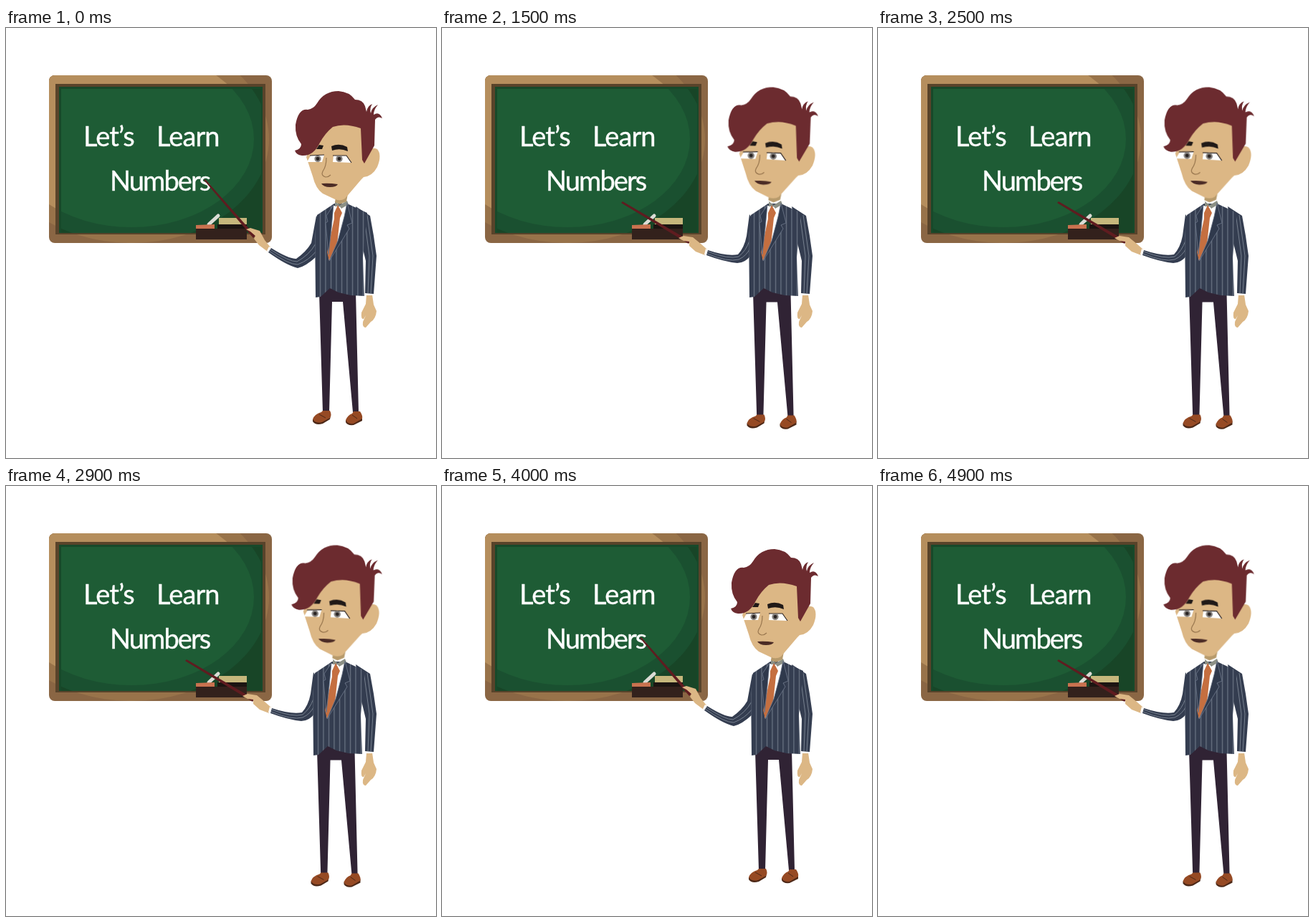
Animation of 600 by 600 pixels, one loop 5 s. Source, as an HTML page:

```html
<!DOCTYPE html>
<html lang="en">
<head>
<meta charset="utf-8">
<title>Let's Learn Numbers</title>
<style>
  html, body { margin: 0; width: 100%; height: 100%; overflow: hidden; background: #fff; }
  svg { display: block; width: 100vw; height: 100vh; }
  .words { font: 38px Lato, "Open Sans", sans-serif; letter-spacing: -.9px; fill: #fff; stroke: #fff; stroke-width: .4; }
  .tight { letter-spacing: -1.9px; }
  .skin { fill: #dcb785; }
  .suit { fill: #343d50; }
  .hair { fill: #6c2b2f; }
  .pin { fill: none; stroke: #77818f; stroke-width: 1; }
  .stick { fill: #5f1c20; }
  .up { animation: up 1s step-end infinite; }
  .down { animation: down 1s step-end infinite; }
  @keyframes up { 0% { opacity: 1; } 50%, 100% { opacity: 0; } }
  @keyframes down { 0% { opacity: 0; } 50%, 100% { opacity: 1; } }
</style>
</head>
<body>
<svg viewBox="0 0 600 600" role="img" aria-label="Teacher pointing at a chalkboard">
  <defs>
    <clipPath id="frame"><rect x="60" y="66" width="311" height="234" rx="8"/></clipPath>
    <pattern id="pins" x="435" width="7.5" height="20" patternUnits="userSpaceOnUse">
      <rect width="7.5" height="20" fill="#343d50"/>
      <rect x="3" width="1" height="20" fill="#77818f"/>
    </pattern>

    <g id="head">
      <path fill="#b79a6b" d="M460 236L478 226L475 242L466 246L459 243Z"/>
      <path class="skin" d="M497 178Q508 164 518 169Q525 177 518 194Q511 207 499 208L496 211L473 238Q467 242 459 239L442 231Q432 224 428 207L419 180L428 160L450 134H497Z"/>
      <path class="hair" d="M403 171Q412 169 412 162Q403 151 404 135Q408 112 421 114Q429 113 434 105Q444 88 464 88Q479 89 487 100Q498 100 501 109L503 117Q504 109 511 106Q507 112 509 119Q510 111 519 107Q513 114 513 121Q521 116 525 126Q519 122 515 128L514 164L500 189L497 184L495 140Q473 132 456 138Q445 147 438 160Q429 179 413 178Q405 177 403 171Z"/>
      <path fill="#201917" d="M437 163L443 164L441 169L433 169ZM454 165Q465 160 476 166L477 172Q466 167 455 171Z"/>
      <path fill="#fff" d="M425 178L444 177L441 187L420 187ZM457 178H475L482 188L456 187Z"/>
      <path fill="none" stroke="#2b211e" stroke-width="1.1" d="M424 178L444 177M456 178H475L482 188"/>
      <g fill="#85817e"><circle cx="435" cy="182.5" r="4.6"/><circle cx="465" cy="182.5" r="4.6"/></g>
      <g fill="#282322"><circle cx="435" cy="182.5" r="2.4"/><circle cx="465" cy="182.5" r="2.4"/></g>
      <path fill="none" stroke="#99774f" stroke-width="1.2" d="M447 181Q447 193 442 200Q439 206 446 208Q450 208 453 205"/>
      <path fill="#4b2b25" d="M440 217Q451 216 463 218Q461 222 452 222Q443 222 440 217Z"/>
    </g>

    <g id="torso">
      <path fill="url(#pins)" d="M458 245L434 261L431 290L432 376L439 375L452 363L464 369L481 373L500 374L498 320L504 258L476 245Z"/>
      <path fill="#fff" d="M457 248L466 249L475 246L474 264L463 297L450 324L453 280Z"/>
      <path fill="#8c9085" d="M459 242L466 247L476 241L478 246L468 252L465 248L459 249Z"/>
      <path fill="#c56f40" d="M463 247L469 258L466 265L462 302L451 325L448 313L458 266L458 258Z"/>
      <path fill="#2f394c" stroke="#717b8f" stroke-width=".8" d="M457 247L447 262L449 270L446 272L450 316L454 280ZM476 244L483 272L476 275L479 280L451 325L463 297L472 263Z"/>
    </g>

    <g id="farArm">
      <path class="skin" d="M503 372H511L513 386L517 395Q516 406 509 410L502 418Q497 418 498 410L502 401L499 406Q495 407 496 397L502 385Z"/>
      <path fill="#fff" d="M501 370H513L512 373H501Z"/>
      <path class="suit" d="M488 249L508 262L513 290L517 318L513 371L501 370L502 325L496 300Z"/>
      <path class="pin" d="M499 258L507 318L505 370M504 261L512 318L509 370"/>
    </g>

    <path id="legs" fill="#302334" d="M437 370L442 536H451L455 382H470L484 536H492L488 368L452 360Z"/>

    <g id="shoes">
      <path fill="#4c2817" d="M428 546L441 548L453 541L452 546L442 552Q432 555 428 549ZM474 547L486 549L497 543V548L485 554Q476 555 474 550Z"/>
      <path fill="#964a24" d="M428 546Q430 539 440 536L442 534H452Q455 540 452 544L441 550Q432 552 428 546ZM474 547Q477 540 483 538L485 535H494Q498 541 497 545L485 552Q476 553 474 547Z"/>
      <path fill="none" stroke="#4c2817" d="M437 539L446 544M483 540L490 545"/>
    </g>
  </defs>

  <g clip-path="url(#frame)">
    <rect x="60" y="66" width="311" height="234" fill="#8a6644"/>
    <ellipse cx="175" cy="155" rx="192" ry="145" fill="#98734a"/>
    <ellipse cx="175" cy="155" rx="171" ry="123" fill="#b58e5d"/>
  </g>
  <rect x="69" y="78" width="293" height="210" fill="#58432a"/>
  <rect x="74" y="82" width="284" height="204" fill="#17492a"/>
  <svg x="77" y="85" width="279" height="201" viewBox="77 85 279 201">
    <rect x="77" y="85" width="279" height="201" fill="#184527"/>
    <ellipse cx="175" cy="155" rx="192" ry="145" fill="#1a5030"/>
    <ellipse cx="175" cy="155" rx="171" ry="123" fill="#1e5c35"/>
  </svg>
  <g class="words">
    <text x="108" y="165">Let’s</text>
    <text x="210" y="165">Learn</text>
    <text class="tight" x="145" y="227">Numbers</text>
  </g>
  <path fill="#33211c" d="M265 280H336V295H265Z"/>
  <path fill="#1c1512" d="M295 274H336V280H295Z"/>
  <path fill="#c6b77c" d="M297 265H336V274H297Z"/>
  <path stroke="#dcdcd6" stroke-width="5" stroke-linecap="round" d="M283 274L296 262"/>
  <path fill="#c9724f" d="M265 275L291 274V280H265Z"/>

  <g class="up">
    <path class="stick" d="M276 212L278 211L348 290L345 293Z"/>
    <path class="skin" d="M335 281L341 279L354 283L361 296L369 306L365 312L353 303L346 294L348 290L341 284Z"/>
    <path fill="#fff" d="M367 305L371 308L367 314L364 311Z"/>
    <use href="#farArm"/>
    <use href="#legs"/>
    <use href="#shoes"/>
    <path class="suit" d="M370 307Q394 322 405 322Q419 312 426 300L433 262L445 280L434 318Q418 333 407 335Q391 331 366 313Z"/>
    <path class="pin" d="M369 309Q395 326 406 326Q423 317 432 301M367 311Q394 330 407 330Q423 324 433 311"/>
    <use href="#torso"/>
    <use href="#head"/>
  </g>

  <g class="down">
    <path class="stick" d="M250 244L252 242L346 297L344 301Z"/>
    <path class="skin" d="M330 293L337 290L350 292L361 301L370 309L367 317L354 312L345 304V298L337 297Z"/>
    <path fill="#fff" d="M368 308L372 311L369 318L366 316Z"/>
    <use href="#farArm"/>
    <use href="#legs" transform="matrix(1.028 0 0 1.03 -15.2 -11)"/>
    <use href="#shoes" transform="translate(-2.5 5.5)"/>
    <path class="suit" d="M371 310Q398 319 413 316Q422 306 425 290L429 260L442 280L431 317Q423 328 412 328Q393 326 369 317Z"/>
    <path class="pin" d="M371 312Q400 323 414 319Q424 311 429 297M370 315Q399 327 414 323Q425 318 430 307"/>
    <use href="#torso" transform="translate(-3 0)"/>
    <use href="#head" transform="matrix(1.033 .03 -.012 1.018 -15.9 -20.9)"/>
  </g>
</svg>
</body>
</html>
```
